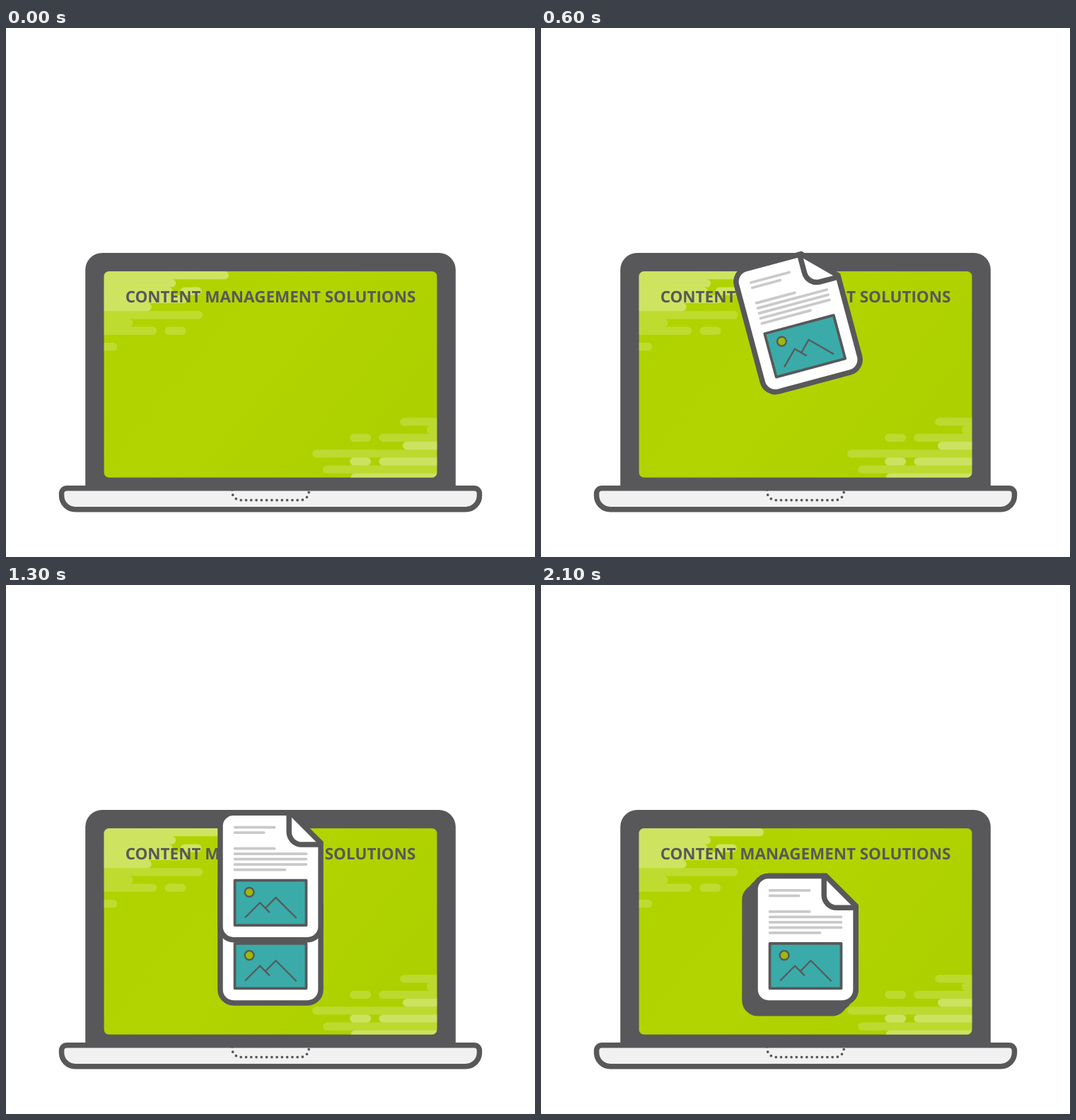
These frames come from a looping animation (748 px wide and 748 px high, 2200 ms). An HTML page:

```html
<!DOCTYPE html>
<html lang="en">
<head>
<meta charset="utf-8">
<title>Content management</title>
<style>
  html, body { margin: 0; width: 100%; height: 100%; overflow: hidden; background: #fff; }
  svg { display: block; width: 100vw; height: 100vh; }
  text { font: 700 3px "Open Sans", "Noto Sans", sans-serif; text-anchor: middle; text-rendering: geometricPrecision; }
</style>
</head>
<body>
<!-- The drawing sits on a grid of 100 by 100 units. -->
<svg viewBox="0 0 100 100">
  <defs>
    <linearGradient id="lime" x1="0" y1="0.1" x2="1" y2="0.6">
      <stop offset="0" stop-color="#afd300"/>
      <stop offset="0.5" stop-color="#b2d400"/>
      <stop offset="1" stop-color="#acd000"/>
    </linearGradient>
    <clipPath id="screen"><rect x="18.5" y="46" width="63" height="39" rx="1"/></clipPath>
    <path id="outline" d="M43 55H53.82L59.5 60.68V76.5a2.5 2.5 0 0 1-2.5 2.5H43a2.5 2.5 0 0 1-2.5-2.5V57.5a2.5 2.5 0 0 1 2.5-2.5z"/>
    <g id="page" fill="none" stroke="#58585a">
      <use href="#outline" fill="#fff"/>
      <path d="M53.5 55V58.6a2.4 2.4 0 0 0 2.4 2.4H59.5"/>
      <path d="M43.25 57.75h7.5m-7.5 1h5.5m-5.5 3h7.5m-7.5 1h13.5m-13.5 1h13.5m-13.5 1h13.5m-13.5 1h9.5"
        stroke="#c9c9ca" stroke-width=".5" stroke-linecap="round"/>
      <rect x="43.25" y="67.75" width="13.5" height="8.5" fill="#3aaba8" stroke-width=".5" stroke-linejoin="round"/>
      <path d="M45.2 74.8L48 72L49.85 73.85M49.05 73L51 71L54.9 74.9" stroke-width=".3"/>
    </g>
  </defs>

  <path d="M15 87V45.7a3.2 3.2 0 0 1 3.2-3.2H81.8a3.2 3.2 0 0 1 3.2 3.2V87z" fill="#58585a"/>
  <g clip-path="url(#screen)">
    <rect x="18.5" y="46" width="63" height="39" fill="url(#lime)"/>
    <g id="clouds" fill="#fff"></g>
  </g>
  <path d="M11.5 87H88.5a1 1 0 0 1 1 1V88.4a2.6 2.6 0 0 1-2.6 2.6H13.1a2.6 2.6 0 0 1-2.6-2.6V88a1 1 0 0 1 1-1z"
    fill="#f1f1f1" stroke="#58585a"/>
  <path d="M42.75 87.3v.35a1.6 1.6 0 0 0 1.6 1.6H55.65a1.6 1.6 0 0 0 1.6-1.6v-.35" pathLength="17" fill="none"
    stroke="#58585a" stroke-width=".5" stroke-linecap="round" stroke-dasharray="0 .999"/>
  <text x="50" y="51.85" fill="#58585a">CONTENT MANAGEMENT SOLUTIONS</text>
  <g id="shadows" fill="#58585a" stroke="#58585a"></g>
  <g id="pages"></g>
</svg>
<script>
const NS = "http://www.w3.org/2000/svg";
const byId = id => document.getElementById(id);

function add(parent, tag, attrs = {}) {
  const node = parent.appendChild(document.createElementNS(NS, tag));
  for (const key in attrs) node.setAttribute(key, attrs[key]);
  return node;
}

// One bar per row grows out of the screen edge; some rows end in a detached pill.
function addCloud(transform, reaches, isBright, hasPill) {
  const group = add(byId("clouds"), "g", { transform });
  reaches.forEach((reach, row) => {
    const bar = (x, width) => add(group, "rect", {
      x, y: row * 1.5, width, height: 1.5, rx: .75, opacity: isBright(row) ? .38 : .19
    });
    bar(-2, reach + 2);
    if (hasPill(row)) bar(reach + 1.5, 4);
  });
}
addCloud("translate(18.5 46)", [23.6, 13.6, 13, 15.8, 9, 18.7, 5.5, 10, 0, 2.5],
  row => row < 5, row => row % 5 === 2);
addCloud("translate(81.5 85.7) scale(-1)", [16.3, 21.6, 11, 23.6, 6.5, 11, 2, 7],
  row => row < 5 && row % 2 === 0, row => row % 3 === 2);

const STEP = 100, LOOP_STEPS = 22, FLIGHT_STEPS = 7, PAUSED_STEP = 12;
const starts = [{ x: -27.15, y: -48.3 }, { x: 0, y: -49.3 }, { x: 27.15, y: -48.3 }];

const fall = u => u * u * (.85 + 1.49 * u - 1.34 * u * u);
const sCurve = u => u ** 2.1 / (u ** 2.1 + (1 - u) ** 2.1);

const shadows = [1, 2].map(n => add(byId("shadows"), "use", {
  href: "#outline", transform: `translate(${-n} ${n})`
}));
const pages = starts.map(start => {
  const group = add(byId("pages"), "g");
  add(group, "use", { href: "#page" });
  const sun = add(group, "circle", { cx: 46, cy: 70, r: .86, stroke: "#58585a", "stroke-width": .32 });
  return { start, group, sun };
});

function posePage({ start, group, sun }, age) {
  group.setAttribute("visibility", age < 0 ? "hidden" : "visible");
  if (age < 0) return;
  const u = Math.min(1, Math.max(0, (age - 1) / (FLIGHT_STEPS - 2)));
  const opacity = Math.min(1, .03 * 4 ** age);
  const x = start.x * (1 - sCurve(u)), y = start.y * (1 - fall(u));
  const angle = 30 * Math.sign(start.x) * Math.min(1, 2.5 * (1 - u));
  group.setAttribute("opacity", opacity);
  group.setAttribute("transform", `translate(${x} ${y}) rotate(${angle} 50 67)`);
  sun.setAttribute("fill", opacity < 1 ? "#e6c800" : "#9fb90a");
}

function render(time) {
  let step = Math.floor(time / STEP) % LOOP_STEPS;
  if (step === PAUSED_STEP) step--;
  pages.forEach((page, i) => posePage(page, step - 1 - i * FLIGHT_STEPS));
  const landed = Math.floor(step / FLIGHT_STEPS);
  shadows.forEach((shadow, i) =>
    shadow.setAttribute("visibility", landed > i + 1 ? "visible" : "hidden"));
}

const startTime = performance.now();
function tick() {
  render(performance.now() - startTime);
  requestAnimationFrame(tick);
}
tick();
</script>
</body>
</html>
```
